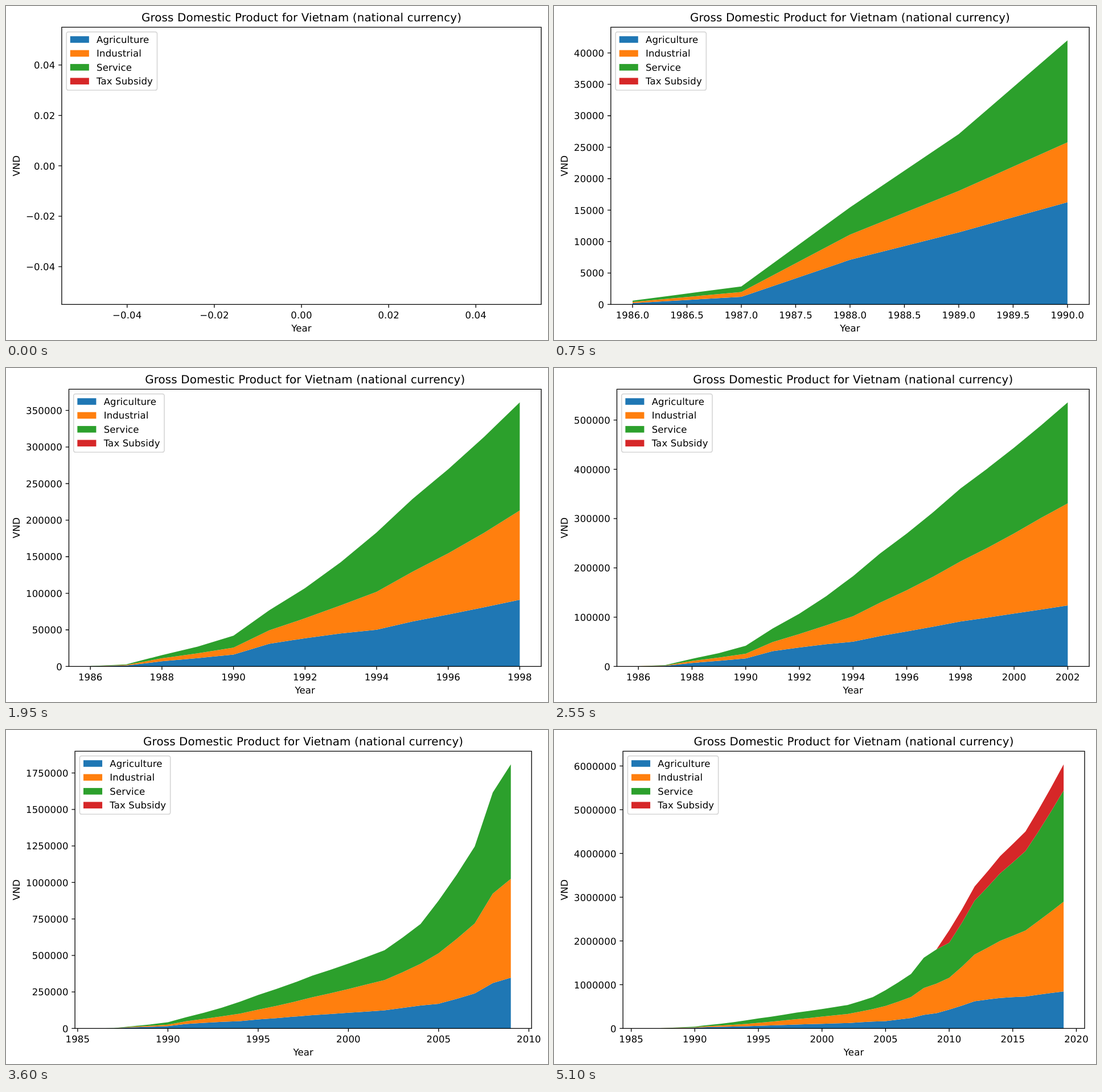
An HTML page for the animation above (5.25 s loop, 952 px wide and 588 px high).

```html
<!DOCTYPE html>
<html lang="en">
<head>
<meta charset="utf-8">
<title>Gross Domestic Product for Vietnam</title>
<style>
  html, body { margin: 0; width: 100%; height: 100%; overflow: hidden; background: #fff; }
  svg { display: block; font-family: "DejaVu Sans", sans-serif; letter-spacing: 0.14px; text-rendering: geometricPrecision; }
</style>
</head>
<body>
<svg id="chart" width="952" height="588" viewBox="0 0 952 588"></svg>
<script>
const STEP_MS = 150, FIRST_YEAR = 1986, STEPS = 35;
const WIDTH = 952, PT = 1.6528, EM = 10 * PT, SPACING = 0.14;
const TOP = 37.3, BOTTOM = 525.4, EDGE = 940.1;
const TICK = 3.5 * PT, LINE = 0.8 * PT;

// Straight lines between [year, value] points
function curve(...points) {
  return year => {
    const i = Math.max(1, points.findIndex(([y]) => y >= year));
    const [y0, v0] = points[i - 1], [y1, v1] = points[i];
    return v0 + (v1 - v0) * Math.max(0, year - y0) / (y1 - y0);
  };
}

// The square root of the total grows in nearly straight stretches
const root = curve([1986, 0.77], [1987, 1.69], [1988, 3.93], [1990, 6.48], [1991, 8.76], [1995, 15.13],
  [1998, 19], [2002, 23.15], [2004, 26.75], [2007, 35.31], [2008, 40.2], [2009, 42.53],
  [2012, 56.97], [2014, 62.75], [2016, 67.1], [2019, 77.7]);
const total = year => 1000 * root(year) ** 2;

// Shares of the total in percent; services take what is left
const farmShare = curve([1986, 38], [1988, 46], [1990, 38.7], [1991, 40.3], [1994, 27.4],
  [2004, 22], [2005, 19.3], [2012, 19.2], [2019, 14]);
const industryShare = curve([1986, 29], [1990, 22.7], [2001, 38], [2004, 40], [2009, 37.4], [2010, 32.5], [2019, 34]);
const taxShare = curve([2009, 0], [2010, 12.5], [2012, 10], [2019, 9.9]);

const layers = [
  { name: "Agriculture", color: "#1f77b4", top: farmShare },
  { name: "Industrial", color: "#ff7f0e", top: year => farmShare(year) + industryShare(year) },
  { name: "Service", color: "#2ca02c", top: year => 100 - taxShare(year) },
  { name: "Tax Subsidy", color: "#d62728", top: () => 100 },
];

const px = v => +v.toFixed(2);

function text(x, y, str, anchor = "start", size = EM, extra = "") {
  return `<text x="${px(x)}" y="${px(y)}" font-size="${px(size)}" text-anchor="${anchor}" ${extra}>${str}</text>`;
}

function labelWidth(str) {
  const em = { ".": 0.318, "\u2212": 0.838 };
  return [...str].reduce((sum, c) => sum + EM * (em[c] || 0.636) + SPACING, 0);
}

// At most nine intervals, with a round step
function ticks([lo, hi]) {
  const raw = (hi - lo) / 9;
  const mag = 10 ** Math.floor(Math.log10(raw));
  const step = mag * [1, 2, 2.5, 5, 10].find(m => m * mag >= raw * (1 - 1e-9));
  let digits = 0;
  while (Math.abs(step * 10 ** digits - Math.round(step * 10 ** digits)) > 1e-6) digits++;
  const list = [];
  for (let i = Math.ceil(lo / step - 1e-9); i <= hi / step + 1e-9; i++) {
    list.push({ value: i * step, label: (i * step).toFixed(digits).replace("-", "\u2212") });
  }
  return list;
}

function limits(count) {
  if (!count) return { x: [-0.055, 0.055], y: [-0.055, 0.055] };
  const last = FIRST_YEAR + count - 1;
  const pad = count === 1 ? FIRST_YEAR * 0.055 : (count - 1) * 0.05;
  return { x: [FIRST_YEAR - pad, last + pad], y: [0, total(last) * 1.05] };
}

function areas(count, sx, sy) {
  if (count < 2) return "";
  const years = Array.from({ length: count }, (_, i) => FIRST_YEAR + i);
  const edge = top => years.map(year => `${px(sx(year))},${px(sy(total(year) * top(year) / 100))}`);
  return layers.map(({ color, top }, i) => {
    const floor = i ? layers[i - 1].top : () => 0;
    return `<polygon points="${[...edge(top), ...edge(floor).reverse()].join(" ")}" fill="${color}"/>`;
  }).join("");
}

function legend(left) {
  const x = left + 0.5 * EM, y = TOP + 0.5 * EM, pad = 0.4 * EM;
  const rows = layers.map(({ name, color }, i) => {
    const base = y + pad + 12.6 + i * 24.45;
    return `<rect x="${px(x + pad)}" y="${px(base - 0.7 * EM)}" width="${px(2 * EM)}" height="${px(0.7 * EM)}" fill="${color}"/>`
      + text(x + pad + 2.8 * EM, base, name);
  });
  return `<rect x="${px(x)}" y="${px(y)}" width="159.3" height="102.7" rx="3.3" fill="#fff" fill-opacity=".8" `
    + `stroke="#ccc" stroke-opacity=".8" stroke-width="${PT}"/>` + rows.join("");
}

function draw(count) {
  const lim = limits(count);
  const xt = ticks(lim.x), yt = ticks(lim.y);
  const frac = (v, [lo, hi]) => (v - lo) / (hi - lo);

  // Margins make room for the widest y label and the last x label
  const left = 35 + Math.max(...yt.map(t => labelWidth(t.label))) + 2 * TICK;
  const end = xt[xt.length - 1];
  const spare = (1 - frac(end.value, lim.x)) * 0.775 * WIDTH;
  const right = EDGE - Math.max(0, labelWidth(end.label) / 2 - spare);

  const sx = v => left + frac(v, lim.x) * (right - left);
  const sy = v => BOTTOM - frac(v, lim.y) * (BOTTOM - TOP);
  const mid = (left + right) / 2, half = (TOP + BOTTOM) / 2;

  let marks = "", labels = "";
  for (const { value, label } of xt) {
    marks += `M${px(sx(value))} ${BOTTOM}v${px(TICK)}`;
    labels += text(sx(value), 549.8, label, "middle");
  }
  for (const { value, label } of yt) {
    marks += `M${px(left)} ${px(sy(value))}h${px(-TICK)}`;
    labels += text(left - 2 * TICK, sy(value) + 6.2, label, "end");
  }

  return areas(count, sx, sy)
    + `<path d="${marks}M${px(left)} ${TOP}H${px(right)}V${BOTTOM}H${px(left)}Z" fill="none" stroke="#000" stroke-width="${px(LINE)}"/>`
    + labels
    + text(mid, 27.4, "Gross Domestic Product for Vietnam (national currency)", "middle", 12 * PT)
    + text(mid, 572.7, "Year", "middle")
    + text(0, 0, "VND", "middle", EM, `transform="translate(24.4 ${px(half)}) rotate(-90)"`)
    + legend(left);
}

const chart = document.getElementById("chart");
const start = performance.now();
let shown = -1;

function tick() {
  const count = Math.floor((performance.now() - start) / STEP_MS) % STEPS;
  if (count !== shown) {
    shown = count;
    chart.innerHTML = draw(count);
  }
  requestAnimationFrame(tick);
}
tick();
</script>
</body>
</html>
```
